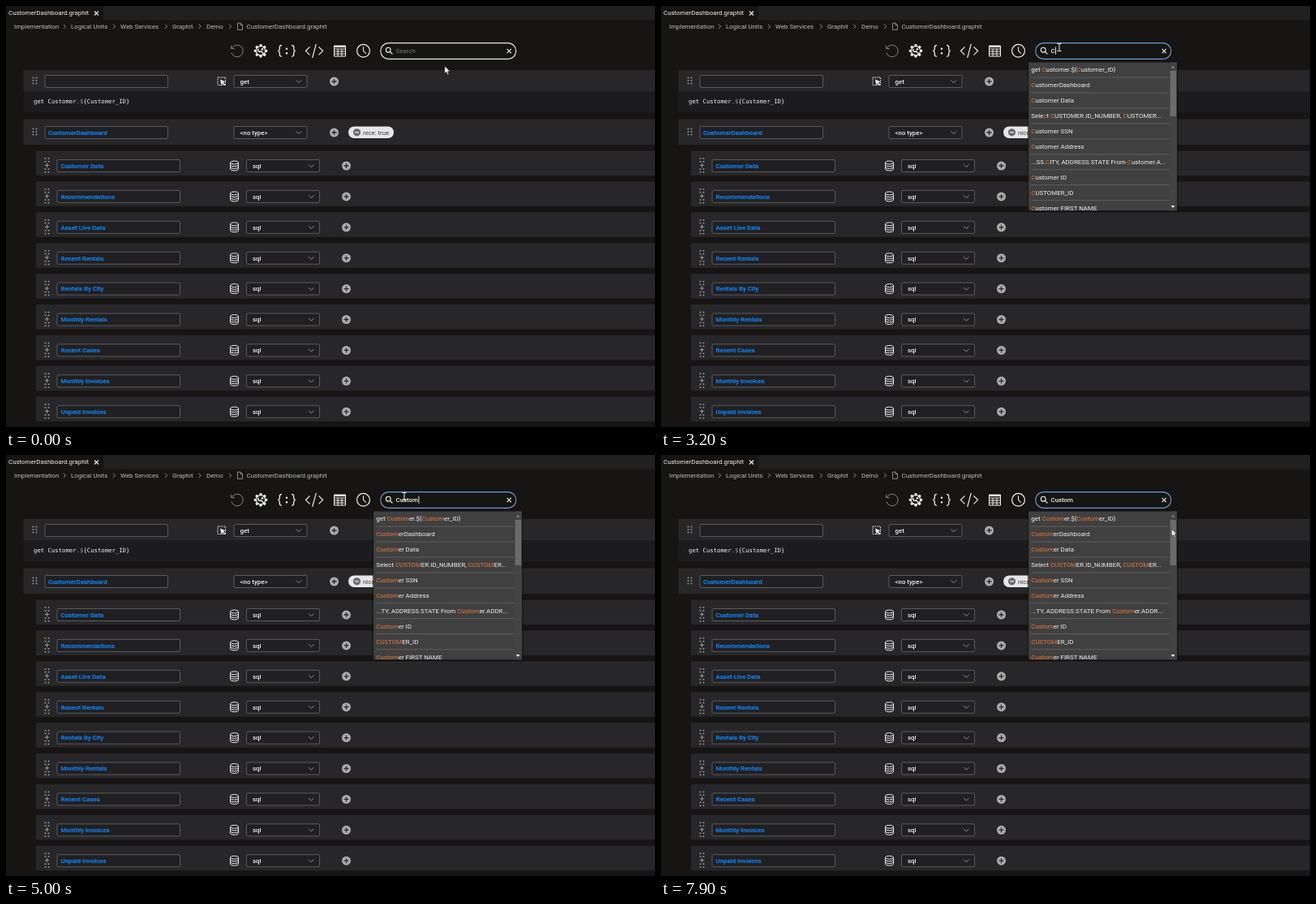
These frames come from a looping animation (800 px wide and 519 px high, 8 s). An HTML page:

```html
<!DOCTYPE html>
<html lang="en">
<head>
<meta charset="utf-8">
<title>Dashboard search</title>
<style>
html, body { margin: 0; width: 100%; height: 100%; overflow: hidden; background: #161514; }
svg { display: block; width: 800px; height: 519px; }
text { font: 7.9px Roboto, sans-serif; fill: #f0f0f0; white-space: pre; }
.mid { font-weight: 500; }
.name { font-weight: 500; fill: #0f83f5; stroke: #0f83f5; stroke-width: .2; }
.crumb { fill: #bdbdbd; }
.code { font: 7.29px "DejaVu Sans Mono", monospace; }
.line { fill: none; stroke: #f0f0f0; }
.dim { stroke: #9a9a9a; }
.hit { fill: #e57a35; }
</style>
</head>
<body>
<svg id="stage" viewBox="0 0 800 519"></svg>
<script>
const stage = document.getElementById('stage');
const esc = s => s.replace(/&/g, '&amp;').replace(/</g, '&lt;');
const text = (x, y, s, cls = '') => `<text x="${x}" y="${y + 2.8}" class="${cls}">${esc(s)}</text>`;
const rect = (x, y, w, h, fill, more = '') =>
  `<rect x="${x}" y="${y}" width="${w}" height="${h}" fill="${fill}" ${more}/>`;
const path = (d, cls = 'line', w = 1, more = '') => `<path d="${d}" class="${cls}" stroke-width="${w}" ${more}/>`;
const at = (x, y, s) => `<g transform="translate(${x} ${y})">${s}</g>`;
const circle = (x, y, r, fill, more = '') => `<circle cx="${x}" cy="${y}" r="${r}" fill="${fill}" ${more}/>`;
const cross = (x, y, r) => path(`M${x - r} ${y - r}l${2 * r} ${2 * r}m0 ${-2 * r}l${-2 * r} ${2 * r}`, 'line', 1.1);
const box = (x, y, w) => rect(x + .5, y - 7.5, w, 15, '#202022', 'stroke="#616163" stroke-width=".9" rx="1.5"');

const dots = ys => ys.map(y => [-2, 2].map(x => rect(x - .8, y - .8, 1.6, 1.6, '#a5a5a5')).join('')).join('');
const select = (x, y, s) => box(x, y, 90) + text(x + 8, y, s, 'mid') +
  path(`M${x + 77} ${y - 1.6}l3.3 3.3l3.3 -3.3`, 'line dim', .9);
const plus = (x, y) => circle(x, y, 5.5, '#adadad') + path(`M${x - 3} ${y}h6m-3 -3v6`, '', 1.3, 'stroke="#29292b"');
const database = (x, y) => at(x, y, path('M-5 -4a5 2 0 0 1 10 0a5 2 0 0 1 -10 0v8a5 2 0 0 0 10 0v-8' +
  'M-5 -1.3a5 2 0 0 0 10 0M-5 1.4a5 2 0 0 0 10 0', 'line', .95));

function toolbar() {
  const teeth = [...Array(8)].map((_, i) =>
    `<rect x="-1.6" y="-8.2" width="3.2" height="3" rx=".8" fill="#ededed" transform="rotate(${i * 45})"/>`).join('');
  return at(285, 55.3, path('M-6.6 -3.2A7.3 7.3 0 1 1 -7.1 2.2M-7.3 -6.6v3.9h4', 'line', 1, 'style="stroke:#858585"')) +
    at(314, 55.3, teeth + circle(0, 0, 5.6, 'none', 'stroke="#ededed" stroke-width="1.2"') +
      path('M-2.5 -2.5a2 2 0 1 0 2.8 2.8L5.5 5.8', 'line', 1.5) + circle(2, -2, 1.3, '#ededed')) +
    at(346, 55.3, path('M-6 -7q-2.7 0 -2.7 2.6v2q0 2 -2 2.4q2 .4 2 2.4v2q0 2.6 2.7 2.6' +
      'M6 -7q2.7 0 2.7 2.6v2q0 2 2 2.4q-2 .4 -2 2.4v2q0 2.6 -2.7 2.6', 'line', 1.3) +
      circle(0, -2.5, 1.2, '#f0f0f0') + circle(0, 3, 1.2, '#f0f0f0')) +
    at(380, 55.3, path('M-5.5 -5l-5 5l5 5M5.5 -5l5 5l-5 5M2.3 -8.5l-4.6 17', 'line', 1.2)) +
    at(411.5, 55.5, path('M-7 -6.5h14v13h-14zM-7 -2.5h14M-7 .5h14M-7 3.5h14M-2.4 -2.5v9M2.4 -2.5v9', 'line', 1) +
      rect(-7, -6.5, 14, 2, '#f0f0f0')) +
    at(440.5, 55.3, circle(0, 0, 7.9, 'none', 'stroke="#f0f0f0" stroke-width="1.2"') + path('M0 -5v5l3.3 3.4', 'line', 1.1));
}

function header() {
  const crumbs = [[10, 'Implementation'], [80, 'Logical Units'], [141, 'Web Services'], [205, 'Graphit'],
    [247, 'Demo'], [296.5, 'CustomerDashboard.graphit']];
  return rect(120, 0, 680, 17.5, '#202021') + text(3, 8, 'CustomerDashboard.graphit') + cross(111.5, 9, 2.5) +
    crumbs.map(c => text(c[0], 25, c[1], 'crumb')).join('') +
    [71, 132, 196, 237.5, 275].map(x => path(`M${x} 22.5l2.6 2.7l-2.6 2.7`, 'line dim', .9)).join('') +
    path('M285.5 21h3.7l2.3 2.3v6h-6zM289 21v2.5h2.5', 'line dim', .9);
}

function rows() {
  const names = ['Customer Data', 'Recommendations', 'Asset Live Data', 'Recent Rentals', 'Rentals By City',
    'Monthly Rentals', 'Recent Cases', 'Monthly Invoices', 'Unpaid Invoices'];
  const top = rect(21.5, 79, 779, 26, '#272729') + rect(21.5, 105, 779, 26.5, '#1c1c1e') +
    rect(21.5, 139.5, 779, 31.5, '#272729') +
    at(35.5, 92, dots([-3.5, 0, 3.5])) + at(35.5, 155, dots([-3.5, 0, 3.5])) +
    box(47.5, 93, 151.5) + box(47.5, 156, 151.5) + text(52, 156, 'CustomerDashboard', 'name') +
    select(280.5, 93, 'get') + select(280.5, 156, '<no type>') + plus(404.5, 93) + plus(404.5, 156) +
    path('M261 88h9.5v9.5h-9.5z', 'line', 1, 'stroke-dasharray="1.5 1"') +
    `<path d="M264 90.5l6.5 2.7l-2.6 1.2l2.3 2.4l-1.2 1.1l-2.3 -2.4l-1.3 2.3z" fill="#f0f0f0"/>` +
    `<text x="34" y="120" class="code">get Customer<tspan fill="#999">.$</tspan>{Customer_ID}</text>` +
    rect(422, 148.5, 56, 14.5, '#e6e6e6', 'rx="7.2"') + circle(432.5, 155.8, 4.6, '#6b6b6b') +
    rect(430, 155.2, 5, 1.2, '#eee') + `<text x="440" y="158.5" style="fill:#3c3c3c">nice: true</text>`;
  return top + names.map((name, i) => {
    const y = 197 + i * 37.9;
    return rect(37, y - 18.5, 763, 30.5, '#272729') +
      at(50.5, y - 1, dots([-8, -4.2, 5, 8.8]) + path('M-2.6 .4h5.2M0 -2.2v5.2', 'line dim', 1)) +
      box(62.5, y, 151.5) + text(67.5, y, name, 'name') + database(281.5, y) +
      select(296, y, 'sql') + plus(419.5, y);
  }).join('');
}

stage.innerHTML = rect(0, 0, 800, 519, '#161514') + header() + toolbar() + rows() +
  rect(461.7, 45.6, 167, 19.8, '#151514', 'rx="9.9" stroke-width="1.1" id="field"') +
  circle(471.2, 54.2, 2.9, 'none', 'stroke="#f0f0f0" stroke-width="1.1"') + path('M473.4 56.4l3 3', 'line', 1.3) +
  cross(620.2, 55.5, 2.6) + '<text id="query" x="480.5" y="58.2"></text>' +
  rect(0, 50.5, .9, 9.2, '#f0f0f0', 'id="caret"') +
  '<clipPath id="clip"><rect x="453" y="69" width="183" height="183"/></clipPath>' +
  '<g id="list">' + rect(451.8, 69, 185.5, 184.8, '#0c0c0c', 'opacity=".6"') + rect(453, 69.5, 183, 182.8, '#404041') +
  '<g id="items" clip-path="url(#clip)"></g>' + rect(627, 69.5, 9, 182.8, '#434344') + rect(627.5, 80, 7.5, 56, '#6b6b6b') +
  '<path d="M628.8 76.5l2.2 -2.8l2.2 2.8z" fill="#8a8a8a"/><path d="M628.6 246l2.4 3l2.4 -3z" fill="#f0f0f0"/></g>' +
  '<g id="cursor">' +
  '<path id="arrow" d="M0 0v9.2l2.1 -1.9l1.5 3.4l1.6 -.7l-1.5 -3.3h2.9z" fill="#fff" stroke="#111" stroke-width=".6"/>' +
  '<path id="beam" class="line" d="M-2.6 -4.5h2q.6 0 .6 .6q0 -.6 .6 -.6h2M0 -4v8M-2.6 4.5h2q.6 0 .6 -.6q0 .6 .6 .6h2"/></g>';

const [field, query, caret, list, items, cursor, arrow, beam] =
  ['field', 'query', 'caret', 'list', 'items', 'cursor', 'arrow', 'beam'].map(id => document.getElementById(id));

// Each entry restarts the caret blink: time, letters typed.
const keys = [[1500, 0], [3100, 1], [3400, 2], [3700, 3], [4400, 4], [4700, 5], [5000, 6], [5100, 6]];
const track = [[0, 540.8, 74], [100, 540.8, 74], [500, 522, 65], [900, 497, 57], [1100, 491.5, 53],
  [1400, 491, 51], [7000, 491, 51], [7400, 560, 70], [7800, 629.3, 91], [8000, 629.3, 91]];

function results(n) {
  const before = 'ESS.CITY, ADDRESS.STATE From ';
  return ['get Customer.${Customer_ID}', 'CustomerDashboard', 'Customer Data',
    'Select CUSTOMER.ID_NUMBER, CUSTOMER...', 'Customer SSN', 'Customer Address',
    '...' + before.slice(n) + 'Customer.' + 'ADDR'.slice(0, 1 + n / 2) + '...',
    'Customer ID', 'CUSTOMER_ID', 'Customer FIRST NAME'];
}

function show(n) {
  query.textContent = n ? 'Custom'.slice(0, n) : 'Search';
  query.setAttribute('class', n ? 'mid' : '');
  query.style.fill = n ? '#f0f0f0' : '#7b7b7b';
  caret.setAttribute('x', n ? 480.9 + query.getComputedTextLength() : 480.4);
  list.style.display = n ? '' : 'none';
  if (!n) return;
  const find = new RegExp('custom'.slice(0, n), 'gi');
  items.innerHTML = results(n).map((s, i) => {
    const y = 78.4 + i * 18.93;
    return `<text x="456.3" y="${y + 2.8}">${esc(s).replace(find, '<tspan class="hit">$&</tspan>')}</text>` +
      path(`M456.5 ${y + 9.7}H626`, 'line', .8, 'stroke-dasharray="1 1" style="stroke:#8a8a8a"');
  }).join('');
}

let shown = -1;
function frame(now) {
  const t = now % 8000;
  const key = keys.filter(k => k[0] <= t).pop();
  const n = key ? key[1] : 0;
  if (n !== shown) show(shown = n);
  caret.style.display = key && Math.floor((t - key[0]) / 500) % 2 === 0 ? '' : 'none';
  field.setAttribute('stroke', t < 1400 ? '#e8e8e8' : '#6e9bd1');

  const i = track.findIndex(p => p[0] > t), a = track[i - 1], b = track[i];
  const k = (t - a[0]) / (b[0] - a[0]);
  const x = a[1] + (b[1] - a[1]) * k, y = a[2] + (b[2] - a[2]) * k;
  cursor.setAttribute('transform', `translate(${x.toFixed(1)} ${y.toFixed(1)})`);
  arrow.style.display = y > 66 ? '' : 'none';
  beam.style.display = y > 66 ? 'none' : '';
  requestAnimationFrame(frame);
}
frame(0);
</script>
</body>
</html>
```
